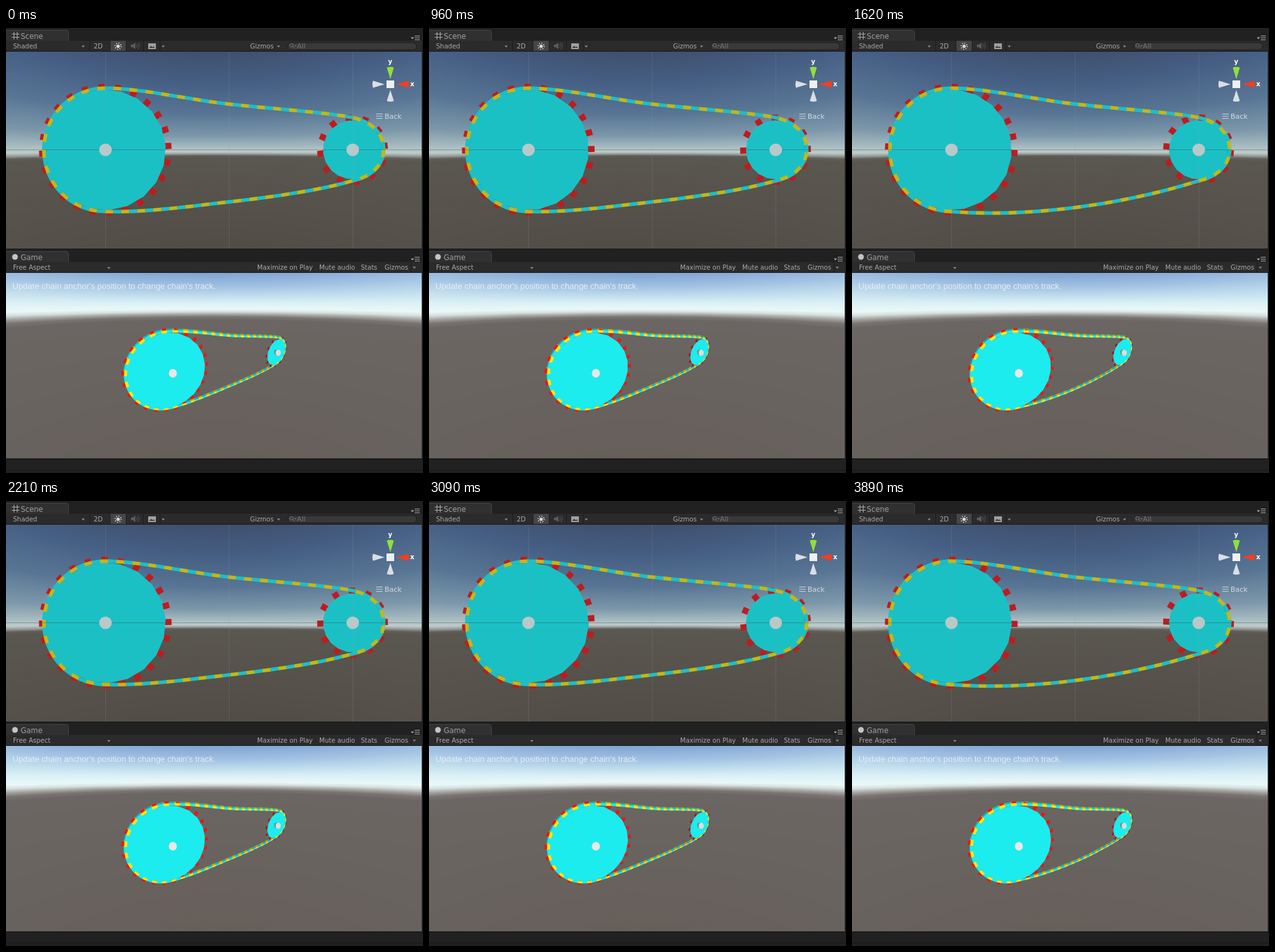
Recreate the animation shown at these times as an HTML page. Size 651 by 696 pixels, loop 3.97 s.

```html
<!DOCTYPE html>
<html lang="en">
<head>
<meta charset="utf-8">
<title>Chain drive</title>
<style>
  html, body { margin: 0; width: 100%; height: 100%; overflow: hidden; background: #212121; }
  svg { display: block; }
  text { font: 10px "DejaVu Sans", sans-serif; fill: #aaa; }
  .tab { font-size: 11.4px; fill: #a0a0a0; }
  .line { fill: none; stroke: #aaa; }
</style>
</head>
<body>
<svg width="651" height="696" viewBox="0 0 651 696">
  <defs>
    <clipPath id="clip1"><path d="M0 37H649V345H0Z"/></clipPath>
    <clipPath id="clip2"><path d="M0 383H649V673H0Z"/></clipPath>
  </defs>

  <!-- window chrome -->
  <path fill="#212121" d="M0 0H651V696H0Z"/>
  <g id="chrome">
    <path fill="#303030" stroke="#454545" d="M-.5 20V3.5H94.5Q97.5 3.5 97.5 7V20M-.5 366V349.5H94.5Q97.5 349.5 97.5 353V366"/>
    <path fill="#2b2b2b" d="M0 20H649V37H0ZM0 366H649V383H0Z"/>
    <path stroke="#171717" d="M0 36.5H649M0 345.5H651M0 382.5H649M0 674.5H651M0 691.5H651"/>
    <path fill="#464646" d="M163 20H187V36H163Z"/>
    <path stroke="#1d1d1d" d="M130.5 20V36M162.5 20V36M187.5 20V36M214.5 20V36M240.5 20V36M632.5 366V382"/>
    <path class="line" d="M12.500 6V18M17.500 6V18M9 9.500H21M9 14.500H21"/>
    <circle cx="14" cy="358" r="4.500" fill="#c4c4c4"/>
    <text class="tab" x="23" y="17">Scene</text>
    <text class="tab" x="23" y="363">Game</text>
    <text x="11" y="32">Shaded</text>
    <text x="137" y="32">2D</text>
    <text x="381" y="32">Gizmos</text>
    <rect x="440" y="23" width="201" height="11" rx="5.500" fill="#393939" stroke="#1e1e1e"/>
    <text x="454" y="31.500" style="font-size:11px;fill:#777">All</text>
    <path fill="none" stroke="#777" d="M448 29L451 32M443 27A2.700 2.700 0 1 1 448.400 27A2.700 2.700 0 1 1 443 27"/>
    <path fill="#777" d="M450 27h4l-2 2z"/>
    <circle cx="175" cy="28.500" r="2.600" fill="#ddd"/>
    <circle cx="175" cy="28.500" r="4.700" fill="none" stroke="#ddd" stroke-width="2" stroke-dasharray="1.200 2.490"/>
    <path fill="#5c5c5c" d="M195 26h3l4-3v10l-4-3h-3z"/>
    <path fill="none" stroke="#5c5c5c" d="M204 25q2 3 0 6M206 23q4 5 0 10"/>
    <path fill="#a0a0a0" d="M222 24h12v9h-12z"/>
    <path fill="#333" d="M223.500 31l3-3 2 2 2-1 2 2z"/>
    <path fill="#8c8c8c" d="M118 27.500h5l-2.500 3zM243 27.500h5l-2.500 3zM423 27.500h5l-2.500 3zM158 374h5l-2.500 3zM635 373.500h5l-2.500 3z"/>
    <g id="menu">
      <path fill="#aaa" d="M632 14.500h5l-2.500 3z"/>
      <path class="line" d="M638 12.500h8M638 15.500h8M638 18.500h8"/>
    </g>
    <use href="#menu" y="346"/>
    <text x="11" y="378">Free Aspect</text>
    <text x="392" y="378">Maximize on Play</text>
    <text x="489" y="378">Mute audio</text>
    <text x="554" y="378">Stats</text>
    <text x="591" y="378">Gizmos</text>
  </g>

  <!-- upper view -->
  <g clip-path="url(#clip1)">
    <g id="sky1"></g>
    <g id="scene"></g>
    <path stroke="#333c40" stroke-opacity=".35" d="M0 190.500H649"/>
    <path stroke="#9a9a94" stroke-opacity=".2" d="M155.500 37V345M348.500 37V345M541.500 37V345"/>
    <g fill="#b9c8c9">
      <circle cx="155.300" cy="190.500" r="9.800"/>
      <circle cx="541.300" cy="190.500" r="9.800"/>
    </g>
    <g id="axes">
      <path fill="#8fe03a" d="M594.500 62q5.500-2.500 11 0L600 80z"/>
      <path fill="#ef3f23" d="M628 82.500q2 5.500 0 11L609 88z"/>
      <path fill="#d9dfe3" d="M573 82.500q-2 5.500 0 11L591 88zM594.500 114q5.500 2.500 11 0L600 97z"/>
      <path fill="#eef0f0" d="M594 82h12v12h-12z"/>
      <text x="596.500" y="56" style="font-weight:bold;fill:#fff">y</text>
      <text x="631" y="91" style="font-weight:bold;fill:#fff">x</text>
      <path stroke="#c9d2d8" d="M578 134.500h10M578 138h10M578 141.500h10"/>
      <text x="591" y="142" style="font-size:11px;fill:#d3dae0">Back</text>
    </g>
  </g>

  <!-- lower view -->
  <g clip-path="url(#clip2)">
    <g id="sky2"></g>
    <g id="game"></g>
    <path fill="#a9a9a9" d="M253.500 537l5-3 2 11-4 1z"/>
    <ellipse cx="260.500" cy="540" rx="6.300" ry="6.800" fill="#e8e8e8"/>
    <path fill="#7c8585" d="M418.500 505l4-2.500 2 8-5 .5z"/>
    <ellipse cx="425" cy="508" rx="4" ry="4.800" fill="#dcdcdc"/>
    <text x="10" y="408" style="font:13px 'Liberation Sans',Arial,sans-serif;fill:#e6edf3">Update chain anchor's position to change chain's track.</text>
  </g>
</svg>
<script>
const NS = 'http://www.w3.org/2000/svg';
const LOOP = 3970, PITCH = 15;
// [ms, step, wheel turn in degrees]
const KEYS = [
  [0, 0, 0], [60, 1, 3.6], [660, 9, 33], [1320, 18, 66.3], [1420, 19, 70.5],
  [1620, 22, 81.5], [1700, 23, 84.8], [2210, 30, 107.8], [2290, 31, 111.3],
  [3090, 42, 149.4], [3170, 43, 152.6], [3890, 53, 184.5], [3970, 54, 188]
];
const SLACK = [[22, 24], [52, 53]];   // steps during which the lower run hangs free

// Backdrop colours by height above the horizon, at the middle of the view
const DUSK = [
  [155, '#3f506e'], [103, '#465f84'], [56, '#587594'], [22, '#7c97aa'], [6, '#a3b8be'],
  [-3, '#bccbca'], [-6, '#9a9f9b'], [-9, '#625f5a'], [-12, '#5a5650'], [-156, '#524c46']
];
const DAY = [
  [50, '#7fa3d2'], [27, '#a3c3e3'], [12, '#c4e0ee'], [2, '#dcf1f6'], [-7, '#e9f8f8'],
  [-11, '#d5e0df'], [-15, '#a5a5a2'], [-19, '#7a7572'], [-24, '#6b6663'], [-242, '#665f5a']
];

const WHEELS = [
  { x: 155, y: 190.5, r: 94.5, teeth: 24, ratio: 1 },
  { x: 541, y: 190.5, r: 46.2, teeth: 12, ratio: 2 }
];
const RUN = 'M155 287C101.700 287 59 243.800 59 190.500S101.700 94 155 94' +
  'C215 95 285 112 348 119S500 132 541 140C570 146 590 164 590 190S568 234 541 239';
const TIGHT = RUN + 'C490 254 410 265 348 272S215 289 155 287Z';
const LOOSE = RUN + 'C425 276 275 297 155 287Z';

function make(tag, parent, attrs) {
  const el = document.createElementNS(NS, tag);
  for (const k in attrs) el.setAttribute(k, attrs[k]);
  return parent.appendChild(el);
}

const rgb = hex => [1, 3, 5].map(i => parseInt(hex.slice(i, i + 2), 16));

// Bands of equal elevation bend away from the horizon towards the sides.
function backdrop(id, horizon, stops) {
  const g = document.getElementById(id);
  stops.slice(1).forEach(([h1, c1], i) => {
    const [h0, c0] = stops[i], a = rgb(c0), b = rgb(c1);
    const n = Math.min(40, Math.ceil((h0 - h1) / 1.5));
    for (let j = 0; j < n; j++) {
      const h = h0 + (h1 - h0) * j / n;
      const fill = `rgb(${a.map((v, m) => Math.round(v + (b[m] - v) * j / n))})`;
      const side = horizon - 1.55 * h, bend = horizon - .45 * h;
      make('path', g, { fill, d: `M0 ${side}Q325 ${bend} 650 ${side}V700H0Z` });
    }
  });
}
backdrop('sky1', 190, DUSK);
backdrop('sky2', 432, DAY);

// Returns a function that gives the point s links along the track.
function track(d) {
  const path = document.createElementNS(NS, 'path');
  path.setAttribute('d', d);
  const len = path.getTotalLength(), links = Math.round(len / 25.3), n = links * 8;
  const pts = Array.from({ length: n }, (_, i) => path.getPointAtLength(len * i / n));
  const at = s => {
    const u = ((s * 8) % n + n) % n, i = Math.floor(u) % n, f = u - Math.floor(u);
    const a = pts[i], b = pts[(i + 1) % n];
    return [a.x + (b.x - a.x) * f, a.y + (b.y - a.y) * f];
  };
  return { at, links };
}

const flat = p => p;
const tilt = (dx, dy) => ([x, y]) => {
  const u = x - 155, v = y - 190.5, w = 1 + .00125 * u + .001 * v;
  return [257 + dx + (.635 * u + .05 * v) / w, 540 + dy + (.61 * v - .125 * u) / w];
};

const shape = (pts, project) =>
  'M' + pts.map(p => project(p).map(v => v.toFixed(2)).join(' ')).join('L') + 'Z';

// Rectangle along a-b with half width h.
function bar(a, b, h) {
  const dx = b[0] - a[0], dy = b[1] - a[1], k = h / Math.hypot(dx, dy);
  const nx = -dy * k, ny = dx * k;
  return [[a[0] + nx, a[1] + ny], [b[0] + nx, b[1] + ny], [b[0] - nx, b[1] - ny], [a[0] - nx, a[1] - ny]];
}

const polar = (w, deg, r) => {
  const a = deg * Math.PI / 180;
  return [w.x + r * Math.cos(a), w.y + r * Math.sin(a)];
};
const range = n => [...Array(n).keys()];

const teeth = (w, phase) => range(w.teeth).map(i => {
  const a = phase * w.ratio + i * 360 / w.teeth;
  return bar(polar(w, a, w.r - 2), polar(w, a, w.r + 9), 4.8);
});
const disc = (w, phase) => [range(20).map(i => polar(w, phase * w.ratio + i * 18, w.r))];
const chain = (run, phase, shift) => range(run.links).map(i => {
  const s = i + shift + phase / PITCH;
  return bar(run.at(s), run.at(s + .5), 2.8);
});

// A layer is [colour, projection, shapes(phase, run)]; yellow links sit on the teeth.
const chainLayers = (cyan, yellow, project) => [
  [cyan, project, (p, run) => chain(run, p, .25)],
  [yellow, project, (p, run) => chain(run, p, -.25)]
];
const wheelLayers = (reds, cyan, project) => [
  ...WHEELS.map((w, i) => [reds[i], project, p => teeth(w, p)]),
  ...WHEELS.map(w => [cyan, project, p => disc(w, p)])
];
function build(id, layers) {
  const g = document.getElementById(id);
  return layers.map(([fill, project, shapes]) => ({ el: make('path', g, { fill }), project, shapes }));
}

const front = tilt(0, 0), back = tilt(-1, -2.2);
const layers = [
  ...build('scene', [
    ...wheelLayers(['#bd1c1f', '#bd1c1f'], '#1bc0c5', flat),
    ...chainLayers('#1bc0c5', '#bdb91e', flat)
  ]),
  ...build('game', [
    ...chainLayers('#15b5ba', '#c8a914', back),
    ...wheelLayers(['#e81717', '#a81416'], '#1cecee', front),
    ...chainLayers('#1cecee', '#f1ea12', front)
  ])
];
const tight = track(TIGHT), loose = track(LOOSE);

let shown = -1;
function draw(t) {
  let i = KEYS.length - 2;
  while (KEYS[i][0] > t) i--;
  const [t0, n0, a0] = KEYS[i], [t1, n1, a1] = KEYS[i + 1];
  const k = Math.floor((t - t0) / (t1 - t0) * (n1 - n0) + 1e-6);
  const step = n0 + k;
  if (step === shown) return;
  shown = step;
  const phase = -3.5 + a0 + (a1 - a0) * k / (n1 - n0);
  const run = SLACK.some(([from, to]) => step >= from && step <= to) ? loose : tight;
  for (const { el, project, shapes } of layers)
    el.setAttribute('d', shapes(phase, run).map(s => shape(s, project)).join(''));
}

const start = performance.now();
function tick() {
  draw((performance.now() - start) % LOOP);
  requestAnimationFrame(tick);
}
tick();
</script>
</body>
</html>
```
